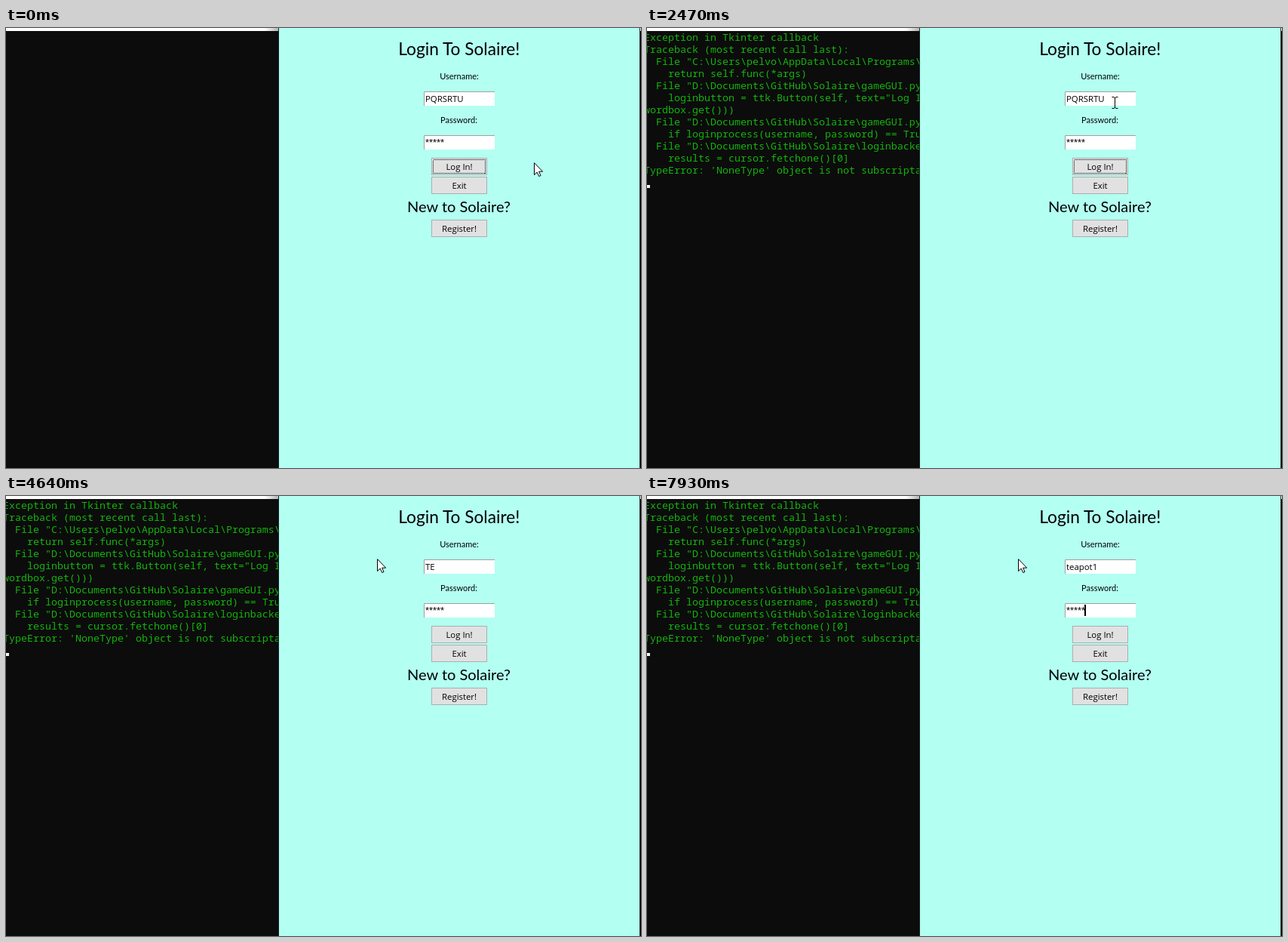
An HTML page that plays this animation: 842 by 583 pixels, repeating every 8000 ms.

```html
<!DOCTYPE html>
<html lang="en">
<head>
<meta charset="utf-8">
<title>Login</title>
<style>
  html, body { margin: 0; width: 100%; height: 100%; overflow: hidden; background: #0c0c0c; }
  pre {
    position: absolute; left: -4px; top: 4px; margin: 0; color: #14b40d;
    font: 13.333px/16px "Noto Sans Mono", monospace;
  }
  svg { position: absolute; left: 0; top: 0; width: 842px; height: 583px; }
  text { font: 11.4px "Open Sans", sans-serif; white-space: pre; }
  .label { font: 11px Lato, sans-serif; text-anchor: middle; }
  .title { font-size: 22.7px; }
  .sub { font-size: 20px; }
  .button text { text-anchor: middle; }
  .button rect { fill: #e1e1e1; stroke: #adadad; }
  .button.hover rect { fill: #e5f1fb; stroke: #0078d7; }
  .stars { font: 12.86px "Liberation Sans", sans-serif; }
  .marked { fill: #fff; }
  .focus { fill: none; stroke: #000; stroke-dasharray: 1 1; shape-rendering: crispEdges; }
</style>
</head>
<body>
<pre id="log">Exception in Tkinter callback
Traceback (most recent call last):
  File "C:\Users\pelvo\AppData\Local\Programs\Python
    return self.func(*args)
  File "D:\Documents\GitHub\Solaire\gameGUI.py"
    loginbutton = ttk.Button(self, text="Log In!"
wordbox.get()))
  File "D:\Documents\GitHub\Solaire\gameGUI.py"
    if loginprocess(username, password) == True:
  File "D:\Documents\GitHub\Solaire\loginbackend.py"
    results = cursor.fetchone()[0]
TypeError: 'NoneType' object is not subscriptable</pre>

<svg viewBox="0 0 842 583">
  <defs>
    <linearGradient id="shade">
      <stop offset="0" stop-color="#fff"/>
      <stop offset="1" stop-color="#b4b4b4"/>
    </linearGradient>
  </defs>
  <rect width="842" height="4" fill="#fff"/>
  <rect x="343" width="18" height="4" fill="url(#shade)"/>
  <rect x="361" width="480" height="583" fill="#1c2726"/>
  <rect x="362" width="478" height="583" fill="#b3fff2"/>
  <rect id="prompt" y="208" width="4" height="4" fill="#f2f2f2"/>

  <text class="label title" x="600.8" y="36">Login To Solaire!</text>
  <text class="label" x="601" y="68">Username:</text>
  <text class="label" x="600.5" y="126">Password:</text>
  <text class="label sub" x="600.5" y="244">New to Solaire?</text>

  <g id="fields"></g>
  <g id="buttons"></g>
  <rect id="focus" class="focus" x="566.5" y="174.5" width="69" height="18"/>

  <path id="arrow" d="M.5 .7V16.6L4.2 13.1 6.7 18.5 9 17.5 6.6 12.2H11.6Z" fill="#fff" stroke="#000"/>
  <path id="beam" d="M-3.5-7.5H-1L.5-6.5 2-7.5H4.5M.5-7V7M-3.5 7.5H-1L.5 6.5 2 7.5H4.5" fill="none" stroke="#000"/>
</svg>

<script>
const LOOP = 8000, LEFT = 556;
const $ = id => document.getElementById(id);

function add(parent, tag, attrs, text = '') {
  const el = document.createElementNS('http://www.w3.org/2000/svg', tag);
  for (const key in attrs) el.setAttribute(key, attrs[key]);
  el.textContent = text;
  return parent.appendChild(el);
}

function button(label, y) {
  const g = add($('buttons'), 'g', { class: 'button' });
  add(g, 'rect', { x: 564.5, y: y + .5, width: 73, height: 22 });
  add(g, 'text', { x: 601, y: y + 16 }, label);
  return g;
}

function field(y, style) {
  const g = $('fields');
  add(g, 'rect', { x: 554, y, width: 94, height: 19, fill: '#fff' });
  add(g, 'path', { d: `M554.5 ${y + 19}V${y + .5}H648`, fill: 'none', stroke: '#a0a0a0' });
  const mark = add(g, 'rect', { y: y + 2, height: 15, fill: '#0078d7' });
  const text = add(g, 'text', { x: LEFT, y: y + 14, class: style });
  const plain = add(text, 'tspan', {});
  const marked = add(text, 'tspan', { class: 'marked' });
  const caret = add(g, 'rect', { y: y + 2, width: 2, height: 15 });
  const width = part => part.textContent ? part.getComputedTextLength() : 0;

  // from: first selected character, at: caret index, or -1 when hidden
  return (value, from, at) => {
    plain.textContent = value.slice(0, from);
    marked.textContent = value.slice(from);
    const w = width(plain), rest = width(marked);
    mark.setAttribute('x', Math.round(LEFT + w));
    mark.setAttribute('width', Math.round(rest));
    caret.setAttribute('x', Math.round(LEFT - 1 + (at > from ? w + rest : w)));
    show(caret, at >= 0);
  };
}

const show = (el, on) => el.setAttribute('visibility', on ? 'visible' : 'hidden');

const login = button('Log In!', 172);
button('Exit', 197);
button('Register!', 254);
const userField = field(84, ''), passField = field(142, 'stars');

const start = {
  x: 700, y: 178, beam: 0, hover: 0, log: 0, focus: 'button',
  user: 'PQRSRTU', pass: '*****', from: 99, caret: 0
};
const at = (x, y, more) => ({ x, y, ...more });
const type = (user, caret = 1) => ({ user, caret, from: 99 });
const stars = n => ({ pass: '*'.repeat(n), caret: 1, from: 99 });
const on = { caret: 1 }, off = { caret: 0 };

const steps = [
  [680, at(676, 163)], [760, at(655, 152)],
  [1310, at(652, 155)], [1385, at(644, 163)], [1460, at(636, 171)],
  [1535, at(630, 174, { hover: 1 })], [1610, at(628, 175)], [1780, at(627, 176)],
  [1930, { log: 1 }],
  [2250, at(625, 164, { hover: 0 })], [2325, at(623, 149, { beam: 1 })],
  [2400, at(621, 111, { beam: 0 })], [2470, at(620, 99, { beam: 1 })],
  [2700, at(620, 98, { focus: 'user', caret: 1 })], [2780, at(610, 97)],
  [2860, at(584, 95, { from: 4 })], [2935, at(548, 91, { from: 0 })],
  [3015, at(502, 86)], [3095, at(458, 83)], [3170, at(443, 83)],
  [3250, at(468, 86)], [3330, at(492, 83, { beam: 0 })],
  [3560, off], [3790, on],
  [3940, type('T')], [4110, type('TE')], [4340, type('TEA')], [4410, type('TE')],
  [4640, off], [4720, on], [4800, type('T')], [4890, type('')], [5120, off],
  [5195, type('t')], [5270, type('te')], [5345, type('tea')], [5420, type('teap', 0)],
  [5650, type('teapot')], [5740, type('teapot1')],
  [5970, { focus: 'pass', from: 0, caret: 1 }], [6600, off], [6830, on],
  [7070, stars(1)], [7140, stars(2)], [7300, stars(3)], [7450, stars(4)],
  [7760, off], [7930, stars(5)]
];

let last = -1;

function draw(now) {
  const t = now % LOOP;
  const count = steps.filter(step => step[0] <= t).length;
  if (count !== last) {
    last = count;
    render(Object.assign({}, start, ...steps.slice(0, count).map(step => step[1])));
  }
  requestAnimationFrame(draw);
}

function render(s) {
  const fill = (set, name) => {
    const active = s.focus === name;
    // dragging leaves the caret at the left end, tabbing at the right
    const index = name === 'user' && s.from < 99 ? s.from : 100;
    set(s[name], active ? s.from : 99, active && s.caret ? index : -1);
  };
  fill(userField, 'user');
  fill(passField, 'pass');
  $('log').style.visibility = s.log ? 'visible' : 'hidden';
  show($('prompt'), s.log);
  show($('focus'), s.focus === 'button');
  login.classList.toggle('hover', !!s.hover);
  for (const id of ['arrow', 'beam']) {
    $(id).setAttribute('transform', `translate(${s.x} ${s.y})`);
    show($(id), (id === 'beam') === !!s.beam);
  }
}

requestAnimationFrame(draw);
</script>
</body>
</html>
```
